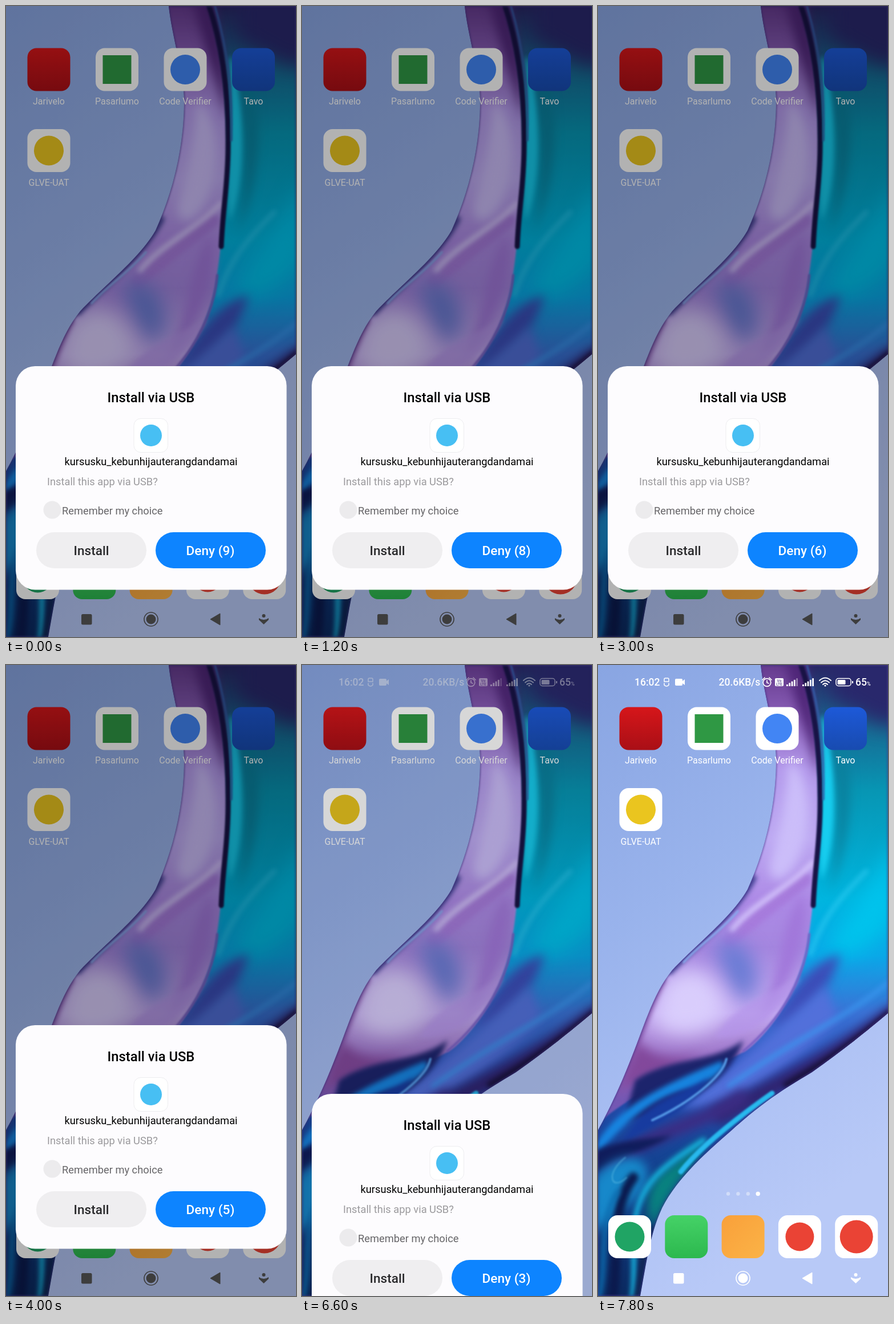
Animation of 508x1102 px, one loop 8000 ms. Source, as an HTML page:

```html
<!DOCTYPE html>
<html lang="en">
<head>
<meta charset="utf-8">
<title>Install prompt</title>
<style>
  html, body { margin: 0; width: 100%; height: 100%; overflow: hidden; background: #9cb5ee; }
  svg { display: block; width: 100vw; height: 100vh; }
  text { font-family: Roboto, "Open Sans", sans-serif; }
  .mid { text-anchor: middle; }
  .medium { font-weight: 500; }
  .line { fill: none; stroke-linecap: round; }
  .soft1 { filter: blur(1.5px); }
  .soft2 { filter: blur(4px); }
  .soft3 { filter: blur(9px); }
  .soft4 { filter: blur(17px); }
</style>
</head>
<body>
<svg viewBox="0 0 508 1102" preserveAspectRatio="none">
  <defs>
    <linearGradient id="sky" x1="0" y1="0" x2=".35" y2="1">
      <stop stop-color="#89a5e2"/><stop offset=".4" stop-color="#99b3ec"/>
      <stop offset=".75" stop-color="#adc1f4"/><stop offset="1" stop-color="#b8c9f7"/>
    </linearGradient>
    <linearGradient id="glass" gradientUnits="userSpaceOnUse" x1="0" y1="0" x2="0" y2="1102">
      <stop stop-color="#292764"/><stop offset=".1" stop-color="#176b94"/>
      <stop offset=".2" stop-color="#0796b4"/><stop offset=".37" stop-color="#00b5df"/>
      <stop offset=".46" stop-color="#0aa8e8"/><stop offset=".55" stop-color="#3a73d6"/>
      <stop offset=".64" stop-color="#2b50b8"/><stop offset=".77" stop-color="#164596"/>
      <stop offset="1" stop-color="#0b2a60"/>
    </linearGradient>
    <linearGradient id="lilac" gradientUnits="userSpaceOnUse" x1="0" y1="0" x2="0" y2="760">
      <stop stop-color="#653a8d"/><stop offset=".12" stop-color="#8a5fb8"/>
      <stop offset=".24" stop-color="#b49aec"/><stop offset=".4" stop-color="#bda9f2"/>
      <stop offset=".54" stop-color="#ad8ae6"/><stop offset=".65" stop-color="#a486df"/>
      <stop offset=".8" stop-color="#c6aef3"/><stop offset=".92" stop-color="#9265bd"/>
      <stop offset="1" stop-color="#7458b4"/>
    </linearGradient>
    <linearGradient id="red" x2="0" y2="1"><stop stop-color="#d6161a"/><stop offset="1" stop-color="#a90f16"/></linearGradient>
    <linearGradient id="blue" x2="0" y2="1"><stop stop-color="#1d59d8"/><stop offset="1" stop-color="#184bb0"/></linearGradient>
    <linearGradient id="green" x2="0" y2="1"><stop stop-color="#45d267"/><stop offset="1" stop-color="#2cb84e"/></linearGradient>
    <linearGradient id="orange" x2="1" y2="1"><stop stop-color="#f9a03a"/><stop offset="1" stop-color="#fbb347"/></linearGradient>
    <path id="ribbon" d="M285 0C290 50 312 120 312 165C312 250 290 330 262 392C235 440 165 495 130 533C95 575 78 640 55 695C35 745 15 785 0 812V1102H74C82 1060 90 1000 108 958C130 905 185 855 235 812C290 762 330 738 375 711C430 672 470 640 508 608V0Z"/>
    <clipPath id="ribbonClip"><use href="#ribbon"/></clipPath>
  </defs>

  <rect width="508" height="1102" fill="url(#sky)"/>
  <g clip-path="url(#ribbonClip)">
    <use href="#ribbon" fill="url(#glass)"/>
    <!-- teal sheet on the right -->
    <path class="soft4" fill="#29286c" d="M405-30H540V95C500 130 450 70 405 60Z"/>
    <path class="soft3" fill="#0a7f9c" d="M415 90C450 160 450 290 405 400C425 320 425 190 405 100Z"/>
    <path class="soft4" fill="#00c3ec" d="M520 300C490 390 430 430 400 500C450 520 490 480 520 440Z"/>
    <path class="soft2" fill="#17cdef" d="M394 90C416 160 424 300 392 375C382 300 396 200 390 90Z"/>
    <path class="soft2 line" stroke="#34cdf3" stroke-width="8" opacity=".6" d="M470 360C430 400 392 440 372 505"/>
    <path class="soft3" fill="#3c4db8" d="M425 505C360 525 335 580 300 640C340 630 400 590 425 505Z"/>
    <!-- blue underside -->
    <path class="soft3" fill="#5270da" d="M400 560C340 610 270 680 140 770C210 790 330 710 420 620Z"/>
    <path class="soft2 line" stroke="#3a96ee" stroke-width="9" opacity=".75" d="M508 555C430 620 340 655 230 735"/>
    <path class="soft3 line" stroke="#30236f" stroke-width="30" d="M515 610C430 674 350 716 215 785"/>
    <path class="soft2 line" stroke="#1a123c" stroke-width="12" d="M515 606C455 655 405 690 330 733"/>
    <path class="soft3 line" stroke="#3c2c83" stroke-width="26" d="M250 755C190 800 90 815 20 870"/>
    <!-- lilac sheet -->
    <path class="soft1" fill="url(#lilac)" d="M280 0H345C376 70 386 150 387 250C387 330 376 430 368 480C360 540 320 620 270 665C220 708 120 700 0 800V690L85 560L250 380L300 200Z"/>
    <path class="soft3" fill="#4f2678" d="M325-20H360C376 60 390 110 384 200C370 120 345 70 325-20Z"/>
    <path class="soft3" fill="#cbbdf9" d="M335 165C376 200 378 290 345 350C325 380 300 385 300 350C318 300 330 230 335 165Z"/>
    <path class="soft2 line" stroke="#a67bdc" stroke-width="24" d="M362 375C318 410 270 445 232 482"/>
    <path class="soft2 line" stroke="#d2c2fa" stroke-width="9" d="M376 345C330 392 270 418 235 462"/>
    <path class="soft3" fill="#a177da" d="M358 400C376 450 340 570 280 620C330 530 310 470 358 400Z"/>
    <path class="soft4" fill="#687bd4" d="M205 485C255 470 295 520 270 580C250 595 225 560 205 485Z"/>
    <path class="soft4" fill="#d9cdfc" d="M110 560C160 510 205 530 225 600C200 650 140 655 100 630Z"/>
    <path class="soft2" fill="#b494e9" opacity=".7" d="M355 545C300 575 240 590 205 650C260 655 310 620 355 545Z"/>
    <path class="soft1 line" stroke="#7960c4" stroke-width="4" d="M370 470C364 545 320 620 255 674"/>
    <path class="soft1 line" stroke="#181345" stroke-width="9" d="M354-5C382 75 390 160 389 245C389 310 380 350 377 420"/>
    <path class="soft1 line" stroke="#335ca8" stroke-width="3" d="M366 0C390 80 397 155 395 235"/>
    <path class="soft2 line" stroke="#383a8c" stroke-width="11" d="M272 372C240 435 165 493 126 535"/>
    <path class="soft1 line" stroke="#89a7ec" stroke-width="4" d="M245 430C210 470 175 490 150 519"/>
    <path class="soft2 line" stroke="#8050a5" stroke-width="9" d="M115 550C90 595 75 650 50 705"/>
    <!-- folds at the lower left -->
    <path class="soft3" fill="#82489b" d="M70 655C95 690 140 690 180 680C130 710 60 720 30 755Z"/>
    <path class="soft2" fill="#1c246c" d="M65 725C130 682 200 697 255 655C235 705 205 740 130 772C95 790 60 790 45 800Z"/>
    <path class="soft2" fill="#1784df" d="M-10 850C25 775 110 735 215 692C232 700 200 725 165 740C95 752 45 800-10 865Z"/>
    <path class="soft2" fill="#173b9f" d="M65 800C100 755 165 740 195 720C180 760 120 795 40 835Z"/>
    <path class="soft1 line" stroke="#579de9" stroke-width="4" d="M225 688C218 720 160 765 95 795"/>
    <path class="soft2" fill="#101d5c" d="M-10 850C45 825 95 830 130 820C90 850 30 855-10 895Z"/>
    <path class="soft3" fill="#1788ca" d="M10 880C45 850 95 855 85 900C65 950 20 960-10 1000V900Z"/>
    <path class="soft3" fill="#08837f" d="M190 825C175 870 120 920 100 980C80 970 80 905 120 880Z"/>
    <path class="soft2 line" stroke="#17bce7" stroke-width="8" d="M185 830C120 872 75 900 65 970C60 1020 66 1070 60 1105"/>
    <path class="soft2 line" stroke="#0b1a4e" stroke-width="18" d="M62 895C20 950 38 1030 25 1110"/>
    <path class="soft2 line" stroke="#0d6db0" stroke-width="8" d="M35 920C-2 970 18 1050 0 1110"/>
    <path class="soft1 line" stroke="#55b7df" stroke-width="2" opacity=".7" d="M48 860C10 890 25 920 50 895"/>
    <path class="soft2 line" stroke="#112450" stroke-width="10" d="M92 985C76 1030 78 1070 66 1110"/>
    <path class="soft1 line" stroke="#28b9ee" stroke-width="9" d="M305 748C245 790 180 840 145 885"/>
    <use href="#ribbon" class="soft1 line" stroke="#46398b" stroke-width="3" opacity=".65"/>
  </g>

  <g id="apps"></g>
  <g id="dots" fill="#fff"></g>

  <g id="status" fill="#fff" stroke="none" font-size="17.5">
    <text class="medium" x="64" y="36">16:02</text>
    <path class="line" stroke="#fff" stroke-width="1.5" d="M116 29V25Q116 23 118 23H122Q124 23 124 25V29M116 29H124M116 32V35Q120 39 124 35V32"/>
    <path d="M137 24H146Q148 24 148 26V28L152 25V35L148 32V34Q148 36 146 36H137Q135 36 135 34V26Q135 24 137 24Z"/>
    <text class="medium" x="211.500" y="36">20.6KB/s</text>
    <g class="line" stroke="#fff" stroke-width="1.7">
      <circle cx="296" cy="30.500" r="6.800"/>
      <path d="M296 27V31L299 32M288 26L292 22M304 26L300 22"/>
    </g>
    <rect x="310" y="23" width="15" height="14" rx="2"/>
    <g class="mid medium" font-size="6.500" fill="#5b438f"><text x="317.500" y="29.500">Vo</text><text x="317.500" y="36">LTE</text></g>
    <g id="signals"></g>
    <g class="line" stroke="#fff" stroke-width="2">
      <path d="M388 27Q398 18 408 27M391 30.500Q398 24 405 30.500M394 34Q398 30 402 34"/>
    </g>
    <circle cx="398" cy="36" r="1.600"/>
    <rect x="417" y="23.500" width="26" height="13" rx="4" fill="none" stroke="#fff" stroke-width="1.500"/>
    <rect x="419.500" y="26" width="14" height="8" rx="1.500"/>
    <rect x="445" y="28" width="2" height="4"/>
    <text class="medium" x="451" y="36">65<tspan font-size="9">%</tspan></text>
  </g>

  <rect id="shade" width="508" height="1102"/>

  <g id="nav">
    <rect x="132" y="1062" width="18.500" height="18.500" rx="2.500"/>
    <circle cx="254" cy="1071" r="12" fill="none" stroke="currentColor" stroke-width="1.700"/>
    <circle cx="254" cy="1071" r="8.500"/>
    <path d="M358 1071L375 1061V1081Z" stroke="currentColor" stroke-linejoin="round"/>
    <circle cx="451.500" cy="1065" r="3"/>
    <path d="M443 1069Q451.500 1075 460 1069V1072L451.500 1080L443 1072Z"/>
  </g>

  <g id="dialog">
    <rect x="17" y="629" width="474.500" height="390.500" rx="34" fill="#fdfcfe"/>
    <text class="mid medium" x="254" y="692" font-size="23.800">Install via USB</text>
    <rect x="224" y="720.500" width="59.500" height="59" rx="12" fill="#fff" stroke="#ededf0"/>
    <circle cx="254" cy="750" r="19" fill="#47bff3"/>
    <text class="mid" x="254" y="802" font-size="18.300">kursusku_kebunhijauterangdandamai</text>
    <text x="72" y="837" font-size="18.300" fill="#9b9a9d">Install this app via USB?</text>
    <circle cx="81" cy="880" r="15.500" fill="#ecebed"/>
    <text x="98" y="888" font-size="18.300" fill="#666568">Remember my choice</text>
    <rect x="53" y="919" width="193" height="63" rx="31.500" fill="#efeef0"/>
    <rect x="262" y="919" width="193" height="63" rx="31.500" fill="#0d84ff"/>
    <g class="mid medium" font-size="22.600">
      <text x="149.500" y="959" fill="#29292b">Install</text>
      <text id="deny" x="358" y="959" fill="#fff"></text>
    </g>
  </g>
</svg>
<script>
const LOOP = 8000, STEP = 200, CLOSE_START = 6400;
const byId = id => document.getElementById(id);

const circle = (color, r) => (x, y) => `<circle cx="${x}" cy="${y}" r="${r}" fill="${color}"/>`;
const square = (color, s) => (x, y) => `<rect x="${x - s / 2}" y="${y - s / 2}" width="${s}" height="${s}" fill="${color}"/>`;

function app(x, y, fill, mark, label) {
  const cx = x + 37.5, cy = y + 37.5;
  return `<rect x="${x}" y="${y}" width="75" height="75" rx="16" fill="${fill}"/>`
    + (mark ? mark(cx, cy) : "")
    + (label ? `<text class="mid" x="${cx}" y="${y + 98.5}" font-size="16" fill="#fff">${label}</text>` : "");
}

byId("apps").innerHTML = [
  app(37.5, 73.5, "url(#red)", null, "Jarivelo"),
  app(157, 73.5, "#fff", square("#2f9844", 50), "Pasarlumo"),
  app(276.5, 73.5, "#fff", circle("#4285f4", 26), "Code Verifier"),
  app(396, 73.5, "url(#blue)", null, "Tavo"),
  app(37.5, 215, "#fff", circle("#eac51f", 26), "GLVE-UAT"),
  app(18, 961, "#fff", circle("#20a464", 26)),
  app(117.300, 961, "url(#green)"),
  app(216.600, 961, "url(#orange)"),
  app(315.900, 961, "#fff", circle("#ea4335", 25)),
  app(415.200, 961, "#fff", circle("#ea4335", 29))
].join("");

byId("dots").innerHTML = [0, 1, 2, 3].map(i =>
  `<circle cx="${228 + i * 17.4}" cy="923.500" r="${i === 3 ? 3.7 : 3.2}" opacity="${i === 3 ? 1 : .4}"/>`).join("");

byId("signals").innerHTML = [330, 358].map(x => [0, 1, 2, 3, 4].map(i => {
  const h = 3 + i * 2.7;
  return `<rect x="${x + i * 4.3}" y="${37 - h}" width="2.800" height="${h}" opacity="${x === 330 && i === 4 ? .4 : 1}"/>`;
}).join("")).join("");

const clamp = v => Math.min(1, Math.max(0, v));

function draw(now) {
  // The screen refreshes in 200 ms steps.
  const t = Math.floor(now % LOOP / STEP) * STEP;
  const slide = clamp((t - CLOSE_START) / 400);
  const dim = (1 - clamp((t - CLOSE_START) / 600)) ** 1.6;
  const navGrey = Math.round(255 - 194 * dim);
  const nav = byId("nav");

  byId("deny").textContent = `Deny (${9 - Math.floor(t / 1000)})`;
  byId("dialog").setAttribute("transform", `translate(0 ${480 * slide * slide})`);
  byId("dialog").setAttribute("visibility", slide < 1 ? "visible" : "hidden");
  byId("shade").setAttribute("opacity", .3 * dim);
  byId("status").setAttribute("opacity", 1 - dim);
  nav.style.color = `rgb(${navGrey},${navGrey},${navGrey})`;
  nav.style.fill = nav.style.color;
  requestAnimationFrame(draw);
}
requestAnimationFrame(draw);
</script>
</body>
</html>
```
